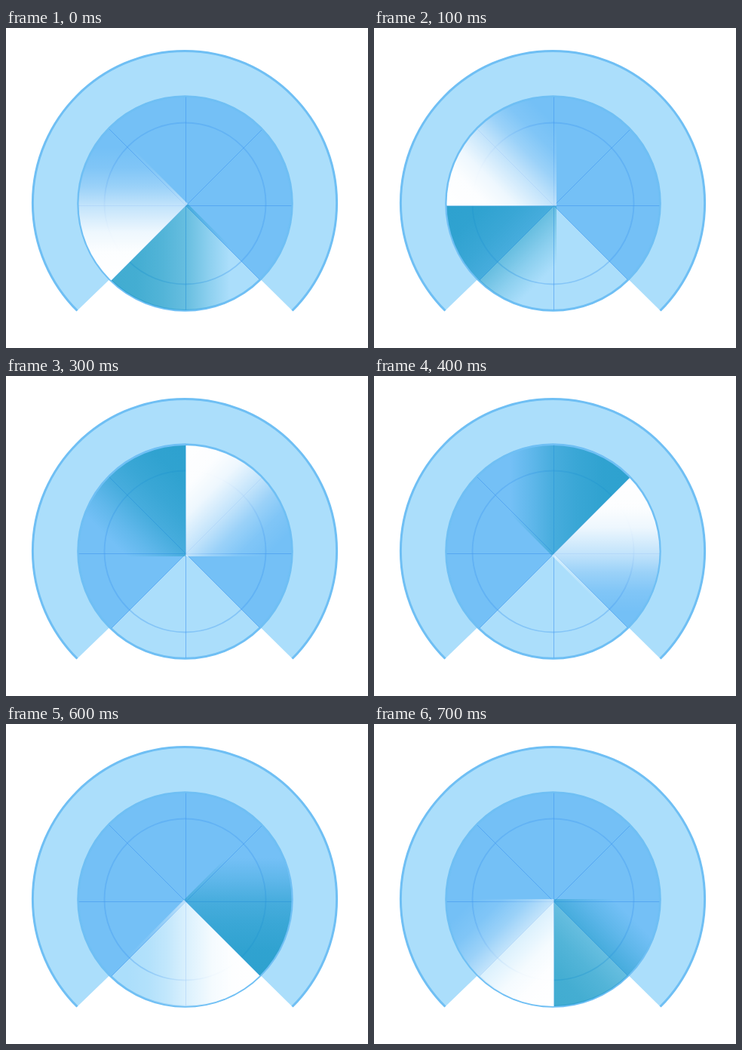
These frames come from a looping animation (480x424 px, 800 ms). An HTML page with a canvas:

```html
<!DOCTYPE html>
<html lang="en">
<head>
<meta charset="utf-8">
<title>Radar sweep</title>
<style>
  html, body { margin: 0; width: 100%; height: 100%; overflow: hidden; background: #fff; }
  canvas { display: block; }
</style>
</head>
<body>
<canvas id="stage" width="480" height="424"></canvas>
<script>
const ctx = document.getElementById('stage').getContext('2d');
const TAU = Math.PI * 2, STEP = TAU / 8;
const LOOP = 800, TICK = 100;
const DISC = { x: 237.5, y: 232.5 };
const HUB = { x: 238.5, y: 235.5 };
const LIGHT = '#abdefb', BLUE = '#74c0f6', RIM = '#6fbff4';

// Stops: [distance across the wedge, opacity]
const GLOW = [[-100, 1], [-62, .98], [-35, .88], [0, .56], [25, .28], [50, .09], [78, 0]];
const TRAIL = [[-100, .65], [-65, .63], [-30, .54], [0, .42], [30, .19], [58, 0]];

function circle(r, c = DISC) {
  ctx.beginPath();
  ctx.arc(c.x, c.y, r, 0, TAU);
}

function stroke(color, width) {
  ctx.strokeStyle = color;
  ctx.lineWidth = width;
  ctx.stroke();
}

function drawBand() {
  const c = { x: 237, y: 232 }, from = STEP * 3, to = STEP * 9;
  ctx.beginPath();
  ctx.moveTo(HUB.x, HUB.y);
  ctx.arc(c.x, c.y, 202, from, to);
  ctx.closePath();
  ctx.fillStyle = LIGHT;
  ctx.fill();
  ctx.beginPath();
  ctx.arc(c.x, c.y, 201.6, from, to);
  stroke(RIM, 3);
}

function drawDisc() {
  circle(142);
  ctx.fillStyle = BLUE;
  ctx.fill();

  ctx.save();
  circle(142);
  ctx.clip();
  ctx.beginPath();
  ctx.moveTo(HUB.x, HUB.y);
  ctx.arc(HUB.x, HUB.y, 160, STEP, STEP * 3);
  ctx.fillStyle = LIGHT;
  ctx.fill();
  ctx.restore();

  circle(141.8);
  stroke(RIM, 3);
  circle(107);
  stroke('rgba(70,155,240,.38)', 1.8);

  ctx.save();
  circle(141);
  ctx.clip();
  ctx.beginPath();
  for (let i = 0; i < 8; i++) {
    ctx.moveTo(HUB.x, HUB.y);
    ctx.lineTo(HUB.x + 150 * Math.cos(i * STEP), HUB.y + 150 * Math.sin(i * STEP));
  }
  stroke('rgba(65,150,240,.58)', 1);
  ctx.restore();
}

// Quarter wedge that fades away from its edge at `angle`; side is 1 ahead, -1 behind
function drawWedge(angle, side, rgb, stops) {
  ctx.save();
  circle(141, { x: 237.5, y: 233 });
  ctx.clip();
  ctx.translate(HUB.x, HUB.y);
  ctx.rotate(angle);
  ctx.scale(1, side);
  ctx.rotate(STEP);
  const fade = ctx.createLinearGradient(0, -100, 0, 100);
  for (const [d, a] of stops) fade.addColorStop((d + 100) / 200, `rgba(${rgb},${a})`);
  ctx.fillStyle = fade;
  ctx.beginPath();
  ctx.moveTo(0, 0);
  ctx.lineTo(160, -160);
  ctx.lineTo(240, 0);
  ctx.lineTo(160, 165);
  ctx.lineTo(-2.5, 2.5);
  ctx.closePath();
  ctx.fill();
  ctx.restore();
}

function draw(now) {
  const step = Math.floor((now % LOOP) / TICK);
  const angle = STEP * (3 + step);
  ctx.fillStyle = '#fff';
  ctx.fillRect(0, 0, 480, 424);
  drawBand();
  drawDisc();
  drawWedge(angle, -1, '8,145,186', TRAIL);
  drawWedge(angle, 1, '255,255,255', GLOW);
}

let start;
function tick(now) {
  start ??= now;
  draw(now - start);
  requestAnimationFrame(tick);
}
draw(0);
requestAnimationFrame(tick);
</script>
</body>
</html>
```
